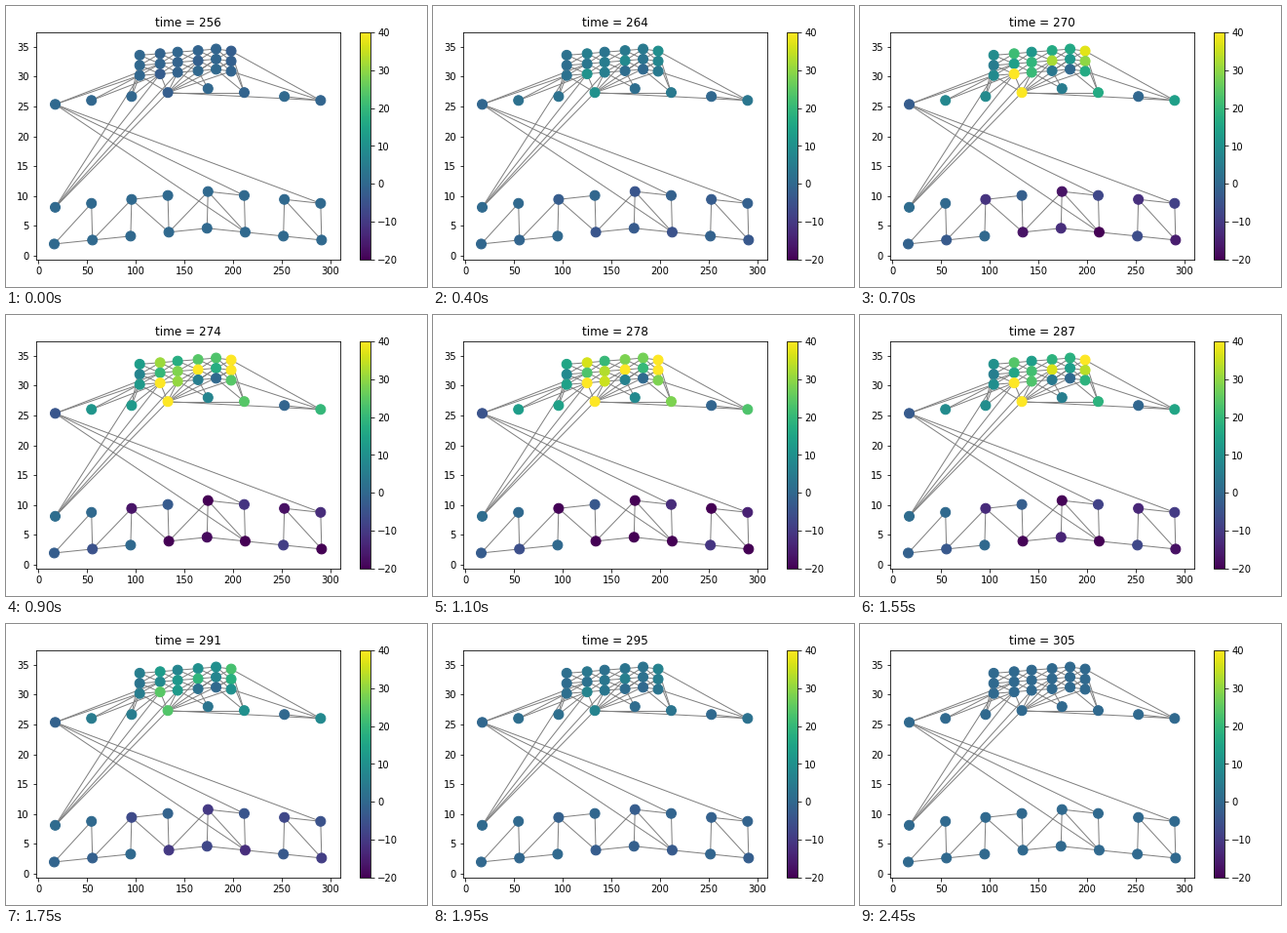
A matplotlib script that plays this animation: 432x288 px, repeating every 2500 ms.

```python
import numpy as np
import matplotlib.pyplot as plt
from matplotlib.animation import FuncAnimation
from matplotlib.collections import LineCollection

START, FRAMES, INTERVAL = 256, 50, 50
PEAK, HALF_WIDTH = 279, 20

# Three parallel arches of eight nodes
k = np.arange(8)
base_x = 16.2 + 39.25 * k
side_x = base_x + (-1.0) ** k


def arch(x, top):
    return np.column_stack([x, top - 0.66 * abs(k - 4)])


bottom, middle, upper = arch(base_x, 4.6), arch(side_x, 10.75), arch(side_x, 28)

# Cluster of six columns, three nodes each
cols = np.array([104, 125, 143, 164, 182.5, 198])
tops = 33.6 + 0.26 * np.arange(6) - 0.6 * (np.arange(6) == 5)
cluster = [np.column_stack([cols, tops - 1.7 * row]) for row in range(3)]
high, mid, low = cluster

xy = np.vstack([bottom, middle, upper, *cluster])

# Peak activity along each row of nodes
peak = np.concatenate([
    [-3, -6, 0, -30, -22, -36, -11, -27],
    [1, 0, -20, -4, -30, -13, -21, -15],
    [-5, 13, 14, 68, 8, 28, -1, 23],
    [15, 36, 20, 28, 27, 64],
    [8, 23, 33, 55, 20, 51],
    [14, 70, 35, 6, 0, 28],
])


def fan(hub, *ends):
    return [(hub, end) for end in ends]


def lower_edges():
    edges = [(bottom[i], middle[i]) for i in range(1, 8)]
    edges += [(bottom[i], bottom[i + 1]) for i in range(7) if i != 2]
    edges += [(middle[i], middle[i + 1]) for i in (2, 4, 6)]
    edges += [(middle[i], bottom[i + 1]) for i in (2, 4, 6)]
    edges += [(bottom[i], middle[i + 1]) for i in (0, 1, 3)]
    return edges


def cluster_edges():
    return [(cluster[r][c], cluster[s][c + 1])
            for c in range(5) for r in range(3) for s in range(3)
            if abs(r - s) <= 1]


edges = lower_edges() + cluster_edges()
edges += fan(middle[0], upper[3], low[0], low[1], low[2])
edges += fan(upper[0], middle[5], bottom[5], middle[7], low[0], mid[1])
edges += fan(upper[1], low[0], low[1])
edges += fan(upper[2], high[0], low[0], low[1])
edges += fan(upper[3], upper[5], upper[7], low[0], *low[1:3],
             *mid[3:], low[5])
edges += fan(upper[4], low[2], low[3])
edges += fan(upper[5], high[5], mid[5], low[4])
edges += fan(upper[7], upper[6], high[5], low[5])


def activity(time):
    phase = np.clip((time - PEAK) / HALF_WIDTH, -1, 1)
    pulse = 0.5 * (1 + np.cos(np.pi * phase))
    dip = 0.04 * np.maximum(peak, 0) * np.exp(-(time - START) / 3)
    return 0.3 + peak * pulse - dip


fig, ax = plt.subplots(figsize=(6, 4), dpi=72)
ax.add_collection(LineCollection(edges, colors="gray", linewidths=1, zorder=1))
dots = ax.scatter(*xy.T, c=activity(START), s=100, cmap="viridis",
                  vmin=-20, vmax=40, zorder=2)
ax.set_xlim(-2.8, 310.2)
ax.set_ylim(-0.7, 37.46)
title = ax.set_title(f"time = {START}")
fig.colorbar(dots, ax=ax)
fig.tight_layout()


def update(frame):
    time = START + frame
    dots.set_array(activity(time))
    title.set_text(f"time = {time}")
    return dots, title


anim = FuncAnimation(fig, update, frames=FRAMES, interval=INTERVAL,
                     repeat=True, repeat_delay=0)
plt.show()
```
